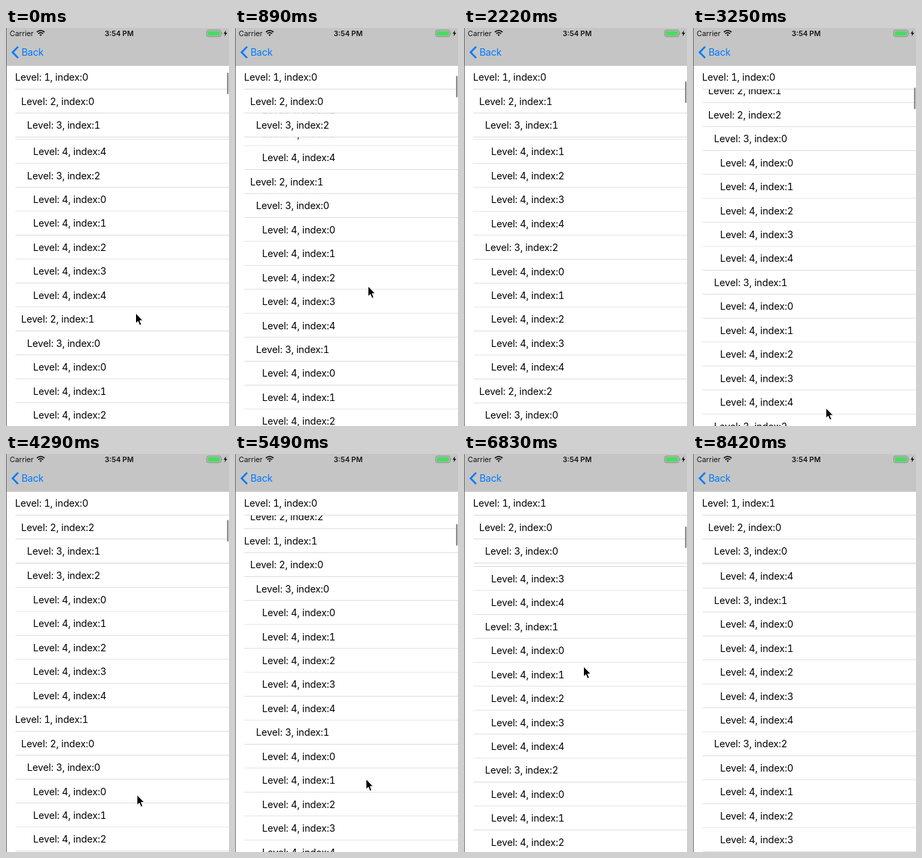
An HTML page that plays this animation: 331 px wide and 589 px high, repeating every 8520 ms.

```html
<!DOCTYPE html>
<html lang="en">
<head>
<meta charset="utf-8">
<title>Sticky nested list</title>
<style>
html, body { margin: 0; width: 100%; height: 100%; overflow: hidden; background: #fff; }
svg { display: block; width: 100vw; height: 100vh; }
text { font-family: Inter, Roboto, sans-serif; }
.row text { font-size: 14.4px; letter-spacing: -.11px; font-variant-numeric: tabular-nums; }
</style>
</head>
<body>
<svg viewBox="0 0 331 589">
  <rect width="331" height="589" fill="#fff"/>
  <g id="list"></g>
  <rect id="bar" x="328" width="2.4" height="32" rx="1.2" fill="#8b8b8b"/>
  <rect width="331" height="56" fill="#c5c5c5"/>
  <g fill="#111">
    <text x="5.6" y="11.7" font-size="10.8">Carrier</text>
    <text x="168" y="11.6" font-size="10.6" font-weight="600" text-anchor="middle">3:54 PM</text>
    <path d="M51.5 12 49.7 10Q51.5 8.6 53.3 10Z"/>
    <path d="M47.8 8.3Q51.5 5.4 55.2 8.3M45.8 6Q51.5 1.3 57.2 6" fill="none" stroke="#111" stroke-width="1.7"/>
    <path d="M320.2 6.2q1.6 1.5 0 3.2z" fill="#777"/>
    <path d="M326.6 3.2 323 8.5h2.3l-.8 4 3.8-5.6h-2.4z"/>
  </g>
  <rect x="297.9" y="3" width="21.2" height="9.8" rx="2.4" fill="none" stroke="#858585" stroke-width=".9"/>
  <rect x="299.3" y="4.4" width="18.4" height="7" rx="1.2" fill="#4cd964"/>
  <path d="M18 27.6 9.8 36l8.2 8.4" fill="none" stroke="#007aff" stroke-width="2.6"/>
  <text x="22.9" y="41.2" font-size="14.4" letter-spacing="-.23" fill="#007aff">Back</text>
  <rect width="1" height="589" fill="#6a6a6a"/>
  <path id="cursor" d="M0 0V15.2L3.4 12 5.9 17.8 8.5 16.7 6.1 11H10.7Z" fill="#000" stroke="#fff"/>
</svg>
<script>
const NS = 'http://www.w3.org/2000/svg';
const LOOP = 8520, STEP = 148.54, LAST_STEP = 54, FADE_STEP = 50;
const TOP = 55.4, ROW = 35.45;
const SPAN = [58, 19, 6, 1]; // rows covered by a header of each level

// flicks: how many times the pointer throws the list on the way to the next pose
const poses = [
  { step: 0, scroll: 351, x: 192.5, y: 422, flicks: 1 },
  { step: 6, scroll: 554.4, x: 197.5, y: 382, flicks: 1 },
  { step: 15, scroll: 918, x: 200, y: 620, flicks: 2 },
  { step: 29, scroll: 1736.2, x: 194.5, y: 504.5, flicks: 1 },
  { step: 37, scroll: 2000.6, x: 194.5, y: 481, flicks: 0 },
  { step: 46, scroll: 2157.2, x: 177.5, y: 314.5, flicks: 0 },
  { step: 48, scroll: 2196.2, x: 176, y: 275, flicks: 0 },
  { step: FADE_STEP, scroll: 2196.2, x: 176, y: 275, flicks: 0 },
  { step: LAST_STEP, scroll: 2196.2, x: 330, y: 640, flicks: 0 }
];

const $ = id => document.getElementById(id);
const mix = (a, b, p) => a + (b - a) * p;
const easeOut = p => 1 - (1 - p) ** 2;

function add(parent, tag, attrs) {
  const el = document.createElementNS(NS, tag);
  for (const k in attrs) el.setAttribute(k, attrs[k]);
  return parent.appendChild(el);
}

function poseAt(n) {
  const i = poses.findIndex(pose => pose.step > n);
  if (i < 0) return poses[poses.length - 1];
  const a = poses[i - 1], b = poses[i], f = a.flicks;
  const p = (n - a.step) / (b.step - a.step);
  const done = Math.floor(p * f);
  const moved = f ? (done + easeOut(p * f - done)) / f : p;
  const reach = f ? (b.scroll - a.scroll) / f : 0;
  return {
    scroll: mix(a.scroll, b.scroll, moved),
    x: mix(a.x, b.x, p),
    y: mix(a.y, b.y, p) - reach * Math.sin(Math.PI * p * f) ** 2
  };
}

// deeper levels lie beneath their headers
const layers = SPAN.map(() => add($('list'), 'g')).reverse();

function makeRow(i) {
  let level = 1, index = Math.floor(i / SPAN[0]), rest = i % SPAN[0];
  while (rest > 0) {
    const span = SPAN[level++];
    index = Math.floor((rest - 1) / span);
    rest = (rest - 1) % span;
  }
  const el = add(layers[level - 1], 'g', { class: 'row' });
  add(el, 'rect', { width: 331, height: ROW, fill: '#fff' });
  add(el, 'text', { x: 4.6 + 8.9 * level, y: 22.9 }).textContent = `Level: ${level}, index:${index}`;
  add(el, 'rect', { x: 14, y: ROW - .9, width: 317, height: .9, fill: '#d6d6d8' });
  return { el, i, level };
}
const rows = Array.from({ length: 82 }, (_, i) => makeRow(i));

function place({ el, i, level }, scroll) {
  const natural = i * ROW - scroll;
  const end = natural + (SPAN[level - 1] - 1) * ROW;
  const y = Math.min(Math.max(natural, (level - 1) * ROW), end);
  const shown = y > -ROW && y < 589 - TOP;
  el.style.display = shown ? '' : 'none';
  if (shown) el.setAttribute('transform', `translate(0 ${(TOP + y).toFixed(2)})`);
}

function draw(time) {
  const n = Math.min(Math.floor((time + 18) / STEP), LAST_STEP);
  const { scroll, x, y } = poseAt(n);
  rows.forEach(row => place(row, scroll));
  $('bar').setAttribute('y', 58 + scroll * .0228);
  $('bar').setAttribute('opacity', Math.min(1, (LAST_STEP - n) / (LAST_STEP - FADE_STEP)));
  $('cursor').setAttribute('transform', `translate(${x} ${y})`);
}

const start = performance.now();
function tick() {
  draw((performance.now() - start) % LOOP);
  requestAnimationFrame(tick);
}
tick();
</script>
</body>
</html>
```
